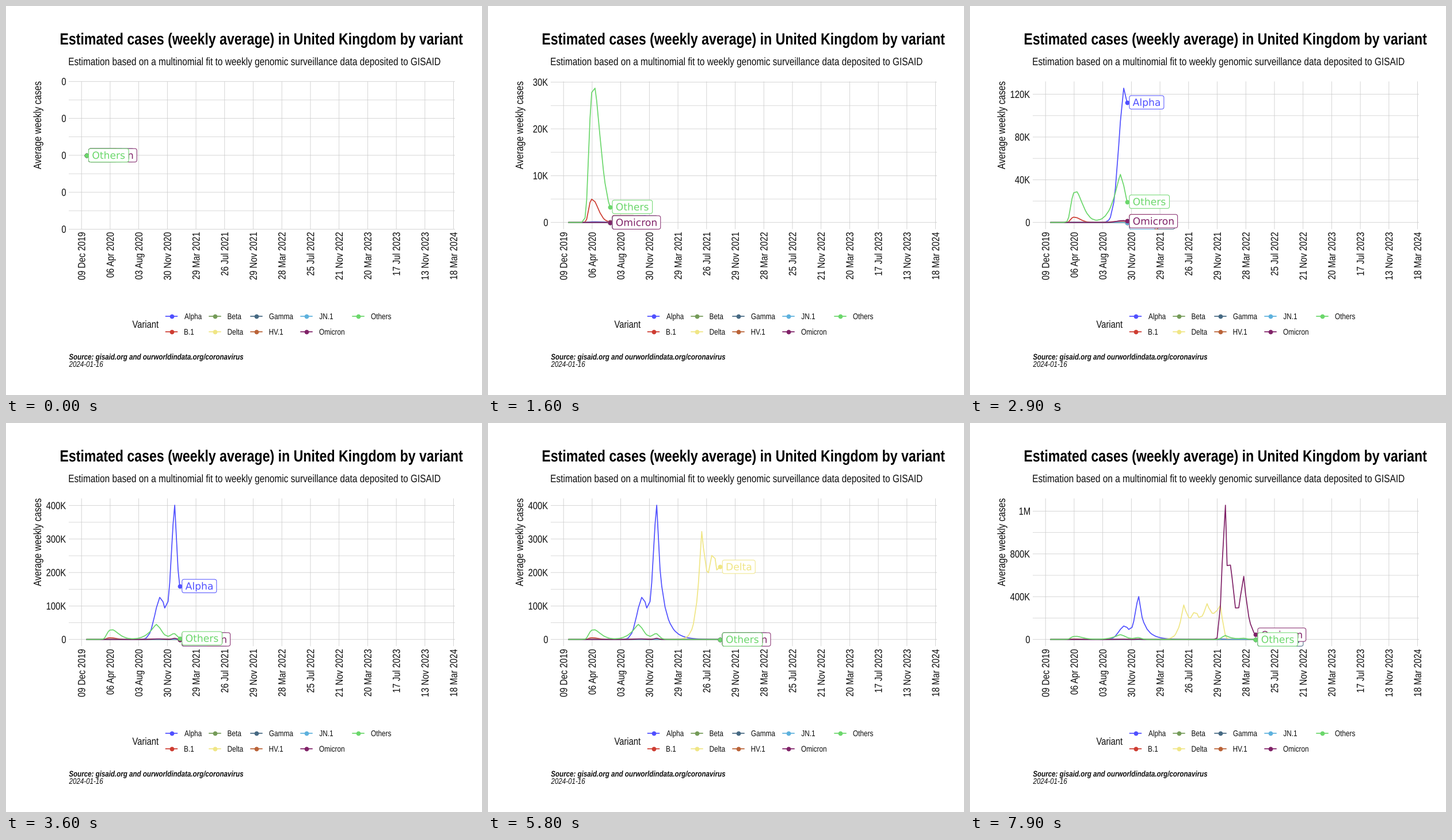
A matplotlib script that plays this animation: 827 by 677 pixels, repeating every 8000 ms.

```python
import numpy as np
import matplotlib.pyplot as plt
from matplotlib.animation import FuncAnimation
from matplotlib.patches import FancyBboxPatch, PathPatch
from matplotlib.textpath import TextPath
from matplotlib.transforms import Affine2D

W, H, DPI = 827, 677, 64
PT = 72 / DPI                      # points per pixel
FRAMES = 80
CONDENSED = 0.82                   # one narrow cut of the sans face
LEFT, RIGHT, TOP, BOTTOM = 109, 780, 131.3, 388.4
ZERO, SPAN = 376.7, 233.7          # baseline and height of the largest value
INK = "#0c0c0c"

COLORS = {
    "Alpha": "#5050FF", "B.1": "#CE3D32", "Beta": "#749B58",
    "Delta": "#F0E685", "Gamma": "#466983", "HV.1": "#BA6338",
    "JN.1": "#5DB1DD", "Omicron": "#802268", "Others": "#6BD76B",
}

# The head moves at a steady pace and stops on whole weeks.
WEEK = np.maximum(np.ceil(np.arange(FRAMES) * 1.558 - 0.165), 0)
X = 139.6 + 2.897 * WEEK


def wave(peak, height, rise, fall, p=2, q=None):
    """An outbreak: widths in weeks and sharpness p, q on either side."""
    d = WEEK - peak
    width = np.where(d < 0, rise, fall)
    power = np.where(d < 0, p, q or p)
    return height * np.exp(-(np.abs(d) / width) ** power)


# Thousands of cases per week
WAVES = {
    "Alpha": [wave(15, 0.15, 4, 10), wave(44.5, 125, 4.7, 3.2),
              wave(53, 401, 3.2, 3.3, 1.6, 0.85), wave(103, 5, 2, 3)],
    "B.1": [wave(14.5, 5, 2.8, 4.8, 3, 1.8), wave(44, 1.3, 8, 7)],
    "Delta": [wave(80, 297, 2.85, 3.5, 1.2), wave(87, 190, 3, 2, 1.2),
              wave(94, 235, 5, 3, 1.2), wave(102, 310, 7, 1.7, 1.2, 1.5)],
    "Omicron": [wave(43.5, 1.8, 5, 4), wave(53, 3.6, 1.8, 1.8),
                wave(105, 800, 2.85, 0.5, 2.8, 1.3),
                wave(107.3, 720, 3.4, 3.4),
                wave(116, 589, 3.3, 2.95, 1.75, 1.1)],
    "Others": [wave(15.5, 29.3, 3.75, 5.6, 3.2, 1.6),
               wave(42, 45, 5.3, 4.4, 1.3, 1.7), wave(52.7, 17, 3.2, 2.6),
               wave(105, 38, 2.6, 4, 2, 1), wave(116, 9, 3, 2.4)],
}
DATA = {name: np.round(sum(WAVES.get(name, []), np.zeros(FRAMES)), 3)
        for name in COLORS}
PEAK = np.maximum.accumulate(np.max(list(DATA.values()), axis=0))

fig = plt.figure(figsize=(W / DPI, H / DPI), dpi=DPI, facecolor="white")
ax = fig.add_axes([0, 0, 1, 1])
ax.set_xlim(0, W)
ax.set_ylim(H, 0)
ax.axis("off")


def glyphs(s, size, family="Liberation Sans", **font):
    return TextPath((0, 0), s, size=size, prop=dict(family=family, **font))


def write(s, x, y, size, right=False, rot=0, color=INK, **font):
    """Condensed text with its baseline at y, aligned on its ink."""
    path = glyphs(s, size, **font)
    box = path.get_extents()
    tf = (Affine2D().translate(-(box.x1 if right else box.x0), 0)
          .scale(CONDENSED, 1).rotate_deg(rot).scale(1, -1).translate(x, y))
    patch = PathPatch(path, fc=color, lw=0, zorder=3,
                      transform=tf + ax.transData)
    return ax.add_patch(patch)


def rule(xs, ys, width):
    return ax.plot(xs, ys, color="#cccccc", lw=width * PT, zorder=1,
                   solid_capstyle="butt", snap=False)[0]


def dot(x, y, color, zorder):
    return ax.plot([x], [y], "o", color=color, ms=7.8 * PT, mew=0,
                   zorder=zorder, snap=False)[0]


def tick_step(top):
    """Pick a round step for about five ticks over the padded range."""
    lo, hi = -0.05 * top, 1.05 * top
    best, pick = -1e9, None
    power = int(np.floor(np.log10(hi)))
    for z in (power - 1, power):
        for rank, q in enumerate((1, 5, 2, 2.5, 4, 3)):
            step = q * 10.0 ** z
            for n in range(1, 10):
                end = n * step
                miss = ((hi - end) ** 2 + lo ** 2) / (0.1 * (hi - lo)) ** 2
                ratio = (max(end, hi) - lo) / (4 * step)
                score = (0.25 * (1 - rank / 5) + 0.2 * (1 - 0.5 * miss)
                         + 0.5 * (2 - max(ratio, 1 / ratio)))
                if score > best:
                    best, pick = score, step
    return pick


def short(k):
    v = k * 1000
    for unit, mark in ((1e6, "M"), (1e3, "K")):
        if v >= unit - 1e-6:
            return f"{v / unit:.0f}{mark}"
    return f"{v:.0f}"


def ticks(top):
    """Major (position, label) pairs and minor positions."""
    if top == 0:
        ys = np.linspace(BOTTOM, TOP, 9)
        return [(y, "0") for y in ys[::2]], list(ys[1::2])
    step = tick_step(top)
    n = int(1.05 * top / step + 1e-9)
    place = lambda v: ZERO - SPAN * v / top
    major = [(place(j * step), short(j * step)) for j in range(n + 1)]
    minor = [place((j + 0.5) * step) for j in range(n + 1)
             if (j + 0.5) * step <= 1.05 * top]
    return major, minor


# Fixed text
write("Estimated cases (weekly average) in United Kingdom by variant",
      95, 67, 28.2, weight="bold", color="black")
write("Estimation based on a multinomial fit to weekly genomic surveillance "
      "data deposited to GISAID", 109.5, 103, 18.8)
write("Average weekly cases", 61, 131.5, 18.8, right=True, rot=90)
write("Source: gisaid.org and ourworldindata.org/coronavirus", 109.5, 615.3,
      14.1, weight="bold", style="italic")
write("2024-01-16", 109.5, 628, 14.1, style="italic")

DATES = ("09 Dec 2019,06 Apr 2020,03 Aug 2020,30 Nov 2020,29 Mar 2021,"
         "26 Jul 2021,29 Nov 2021,28 Mar 2022,25 Jul 2022,21 Nov 2022,"
         "20 Mar 2023,17 Jul 2023,13 Nov 2023,18 Mar 2024").split(",")
for j, date in enumerate(DATES):
    x = 131.2 + 49.72 * j
    rule([x, x], [TOP, BOTTOM], 0.8)
    write(date, x + 6.3, 394, 18, right=True, rot=90)

# Legend, filled column by column
write("Variant", 219.5, 560, 18)
KEYS = (287.5, 363, 435, 522, 612)
for j, (name, color) in enumerate(COLORS.items()):
    x, y = KEYS[j // 2], 540 + 27 * (j % 2)
    ax.plot([x - 10.7, x + 10.7], [y, y], color=color, lw=1.7 * PT,
            solid_capstyle="butt", zorder=3, snap=False)
    dot(x, y, color, 4)
    write(name, x + 22.5, y + 5, 14.4)


class Tag:
    """A line with its leading dot and boxed name."""

    def __init__(self, name, color, order):
        self.vals = DATA[name]
        self.line, = ax.plot([], [], color=color, lw=1.7 * PT,
                             solid_joinstyle="round", solid_capstyle="butt",
                             zorder=4 + order / 100, snap=False)
        self.dot = dot(0, 0, color, 5 + order / 100)
        path = glyphs(name, 17.15, family="DejaVu Sans")
        width = path.get_extents().x1 + 12.8
        self.box = FancyBboxPatch(
            (0, -11.7), width, 23.4,
            boxstyle="round,pad=0,rounding_size=3.6", fc="white", ec=color,
            lw=1.0 * PT, zorder=6 + order / 50)
        self.text = PathPatch(path, fc=color, lw=0, zorder=6.01 + order / 50)
        ax.add_patch(self.box)
        ax.add_patch(self.text)

    def update(self, i):
        top = PEAK[i]
        v = self.vals[:i + 1]
        ys = ZERO - SPAN * v / top if top else np.full(i + 1, (TOP + BOTTOM) / 2)
        x, y = X[i], ys[-1]
        self.line.set_data(X[:i + 1], ys)
        self.dot.set_data([x], [y])
        self.box.set_transform(Affine2D().translate(x + 4, y) + ax.transData)
        self.text.set_transform(
            Affine2D().scale(1, -1).translate(x + 9.8, y + 6.1) + ax.transData)


tags = [Tag(name, color, j) for j, (name, color) in enumerate(COLORS.items())]
axis_parts = []


def draw(i):
    while axis_parts:
        axis_parts.pop().remove()
    major, minor = ticks(PEAK[i])
    for y in minor:
        axis_parts.append(rule([LEFT, RIGHT], [y, y], 0.7))
    for y, label in major:
        axis_parts.append(rule([LEFT, RIGHT], [y, y], 0.8))
        axis_parts.append(write(label, 104, y + 6.3, 18, right=True))
    for tag in tags:
        tag.update(i)
    return []


anim = FuncAnimation(fig, draw, frames=FRAMES, interval=100, repeat=True,
                     repeat_delay=0, init_func=lambda: [], blit=False)
plt.show()
```
